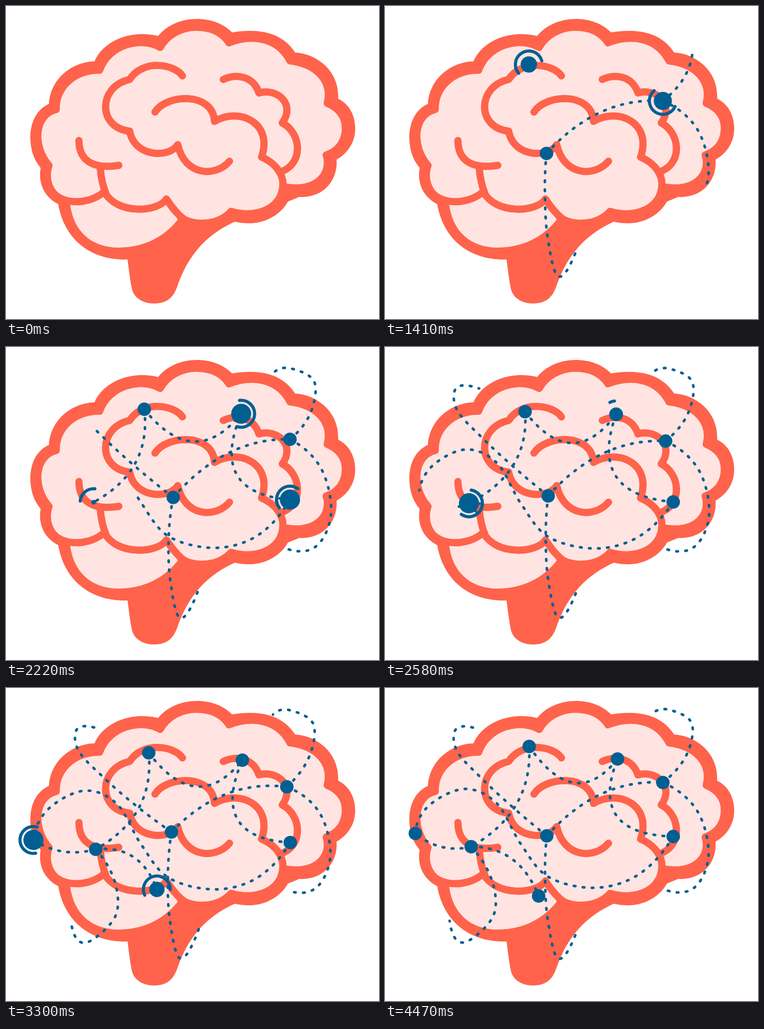
Recreate the animation shown at these times as an HTML page with a canvas. Size 721 by 605 pixels, loop 4.5 s.

```html
<!DOCTYPE html>
<html lang="en">
<head>
<meta charset="utf-8">
<title>Brain connections</title>
<style>
  html, body { margin: 0; width: 100%; height: 100%; overflow: hidden; background: #fff; }
  svg, canvas { position: absolute; left: 0; top: 0; width: 721px; height: 605px; }
  .shell { fill: #ff634b; }
  .tissue { fill: #ffe4e1; }
  .fold { stroke: #ff634b; stroke-width: 14; stroke-linecap: round; stroke-linejoin: round; }
</style>
</head>
<body>
<svg viewBox="0 0 721 605">
  <path class="shell" d="M294 58C312 36 340 25 369 25C396 25 420 34 437 51C480 44 530 46 559 90
    C600 92 645 125 642 179C664 190 675 212 675 237C675 262 662 284 639 297C642 340 610 372 567 369L545 378
    C528 408 490 428 442 417C380 445 348 491 330 545C322 565 310 575 285 575C262 575 246 562 243 545
    C239 525 237 505 235 490C160 492 112 448 101 383C72 368 62 340 67 313C52 295 47 275 47 252
    C48 222 60 200 83 189C86 140 128 108 171 107C188 68 240 45 294 58Z"/>
  <path class="tissue" d="M124 383C130 435 165 467 218 467C265 467 305 447 332 413L310 373L190 360Z"/>
  <path class="tissue fold" d="M298 80C312 56 338 41 368 41C394 41 417 50 431 71C475 54 525 60 549 106
    C600 112 632 145 621 188C645 198 656 215 656 236C656 262 642 280 619 288C630 325 600 360 540 350L535 348
    C533 390 485 412 435 397C410 425 365 424 344 412C330 402 320 388 310 373C295 398 215 405 190 359
    C165 380 130 383 106 372C85 363 74 335 83 308C50 270 55 210 97 200C96 160 128 124 181 124
    C198 75 260 58 298 80Z"/>
  <g class="fold" fill="none">
    <path d="M341 135C325 112 265 102 239 142C178 155 176 235 239 242C248 292 315 295 332 268C345 328 405 332 432 300"/>
    <path d="M288 205C310 170 400 165 403 223C450 195 517 225 494 292C520 303 538 325 535 350"/>
    <path d="M420 142C445 130 478 135 489 168C525 158 560 190 534 226C570 245 575 300 537 318"/>
    <path d="M141 260C141 300 170 316 218 308M182 312C184 335 187 348 193 362"/>
  </g>
</svg>
<canvas width="721" height="605"></canvas>
<script>
const LOOP = 4500, STEP = 30, SPEED = 0.74, BLUE = '#005f92';
const ctx = document.querySelector('canvas').getContext('2d');

// Home position, birth time, ring angle, and the times of the sway's right and low points.
const node = (x, y, start, angle, right, low) => ({ home: [x, y], start, angle, right, low });
const nodes = {
  A: node(318, 284, 330, 6, 600, 2100),
  B: node(543, 185, 1075, -12, 680, 3555),
  C: node(553, 294, 1580, -67, 1275, 2900),
  D: node(273, 120, 1120, 122, 45, 2950),
  E: node(452, 136, 1800, 190, 450, 3800),
  F: node(168, 307, 2110, -175, 400, 3700),
  G: node(59, 288, 2800, -27, 1080, 3000),
  H: node(291, 395, 3030, 146, 1450, 4500)
};

// Each link runs smoothly through its key points; without "to" its end is loose.
const link = (from, to, start, ...via) => ({ from: nodes[from], to: nodes[to], start, via });
const links = [
  link('A', 'B', 785, [424, 205]),
  link('A', '', 860, [312, 362], [316, 448], [336, 523], [373, 465]),
  link('A', '', 1950, [250, 230], [190, 176], [140, 122], [138, 79], [182, 80]),
  link('B', '', 1245, [586, 130], [594, 68], [548, 42], [516, 51]),
  link('B', '', 1130, [606, 238], [627, 322], [600, 385], [544, 391]),
  link('C', 'E', 1705, [447, 250]),
  link('C', 'G', 1705, [488, 364], [405, 388], [315, 366], [262, 302], [215, 223], [153, 197], [85, 231]),
  link('D', 'E', 1805, [364, 186]),
  link('D', 'F', 1805, [252, 228]),
  link('F', 'G', 2540, [111, 311]),
  link('F', 'H', 2540, [243, 327]),
  link('F', '', 2540, [208, 374], [209, 442], [152, 492], [125, 450])
];

const clamp = x => Math.max(0, Math.min(1, x));
const smooth = x => { x = clamp(x); return x * x * (3 - 2 * x); };
const rad = deg => deg * Math.PI / 180;
const wave = (t, peak, period) => Math.cos(2 * Math.PI * (t - peak) / period);

function place(n, t) {
  n.shift = [6 * wave(t, n.right, 1500), 7 * wave(t, n.low, 3000)];
  n.pos = n.home.map((v, j) => v + n.shift[j]);
}

// The pull of a moving end halves with every key point.
function linkPoints({ from, to, via }) {
  const pts = via.map((p, i) => p.map((v, j) =>
    v + from.shift[j] * 0.5 ** (i + 1) + (to ? to.shift[j] * 0.5 ** (via.length - i) : 0)));
  return [from.pos, ...pts, ...(to ? [to.pos] : [])];
}

// Catmull-Rom curve, extended at both ends as a parabola.
function curve(pts) {
  const beyond = (a, b, c) => a.map((v, j) => 3 * v - 3 * b[j] + c[j]);
  const n = pts.length;
  const all = [beyond(...pts), ...pts, beyond(pts[n - 1], pts[n - 2], pts[n - 3])];
  return s => {
    const i = Math.min(Math.floor(s), n - 2), u = s - i;
    const [a, b, c, d] = all.slice(i, i + 4);
    return b.map((v, j) => v + u / 2 * (c[j] - a[j]
      + u * (2 * a[j] - 5 * v + 4 * c[j] - d[j] + u * (3 * (v - c[j]) + d[j] - a[j]))));
  };
}

function drawLink(pts, length) {
  const at = curve(pts), steps = 40 * (pts.length - 1);
  let last = pts[0];
  ctx.beginPath();
  ctx.moveTo(...last);
  for (let k = 1; k <= steps && length > 0; k++) {
    const p = at(k / 40);
    length -= Math.hypot(p[0] - last[0], p[1] - last[1]);
    ctx.lineTo(...p);
    last = p;
  }
  ctx.stroke();
}

function drawNode(n, age) {
  const [x, y] = n.pos;
  const grow = 19.5 * Math.sin(clamp((age - 50) / 400) * Math.PI / 2);
  ctx.beginPath();
  ctx.arc(x, y, grow - 6.5 * smooth((age - 650) / 150), 0, 7);
  ctx.fill();

  const span = 205 * Math.min(clamp(age / 250), clamp((800 - age) / 200));
  if (span <= 0) return;
  const head = n.angle + 205 * clamp(age / 250) + 0.43 * Math.max(0, age - 250);
  ctx.beginPath();
  ctx.arc(x, y, 26, rad(head - span), rad(head));
  ctx.stroke();
}

function draw(t) {
  const all = Object.values(nodes);
  ctx.clearRect(0, 0, 721, 605);
  ctx.strokeStyle = ctx.fillStyle = BLUE;
  ctx.lineCap = ctx.lineJoin = 'round';
  all.forEach(n => place(n, t));

  ctx.lineWidth = 5;
  ctx.setLineDash([3, 14.5]);
  for (const l of links) {
    if (t > l.start) drawLink(linkPoints(l), (t - l.start) * SPEED);
  }

  ctx.lineWidth = 6;
  ctx.setLineDash([]);
  for (const n of all) {
    if (t >= n.start) drawNode(n, t - n.start);
  }
}

const begin = performance.now();
function tick() {
  const t = (performance.now() - begin) % LOOP;
  draw(Math.floor(t / STEP) * STEP);
  requestAnimationFrame(tick);
}
tick();
</script>
</body>
</html>
```
